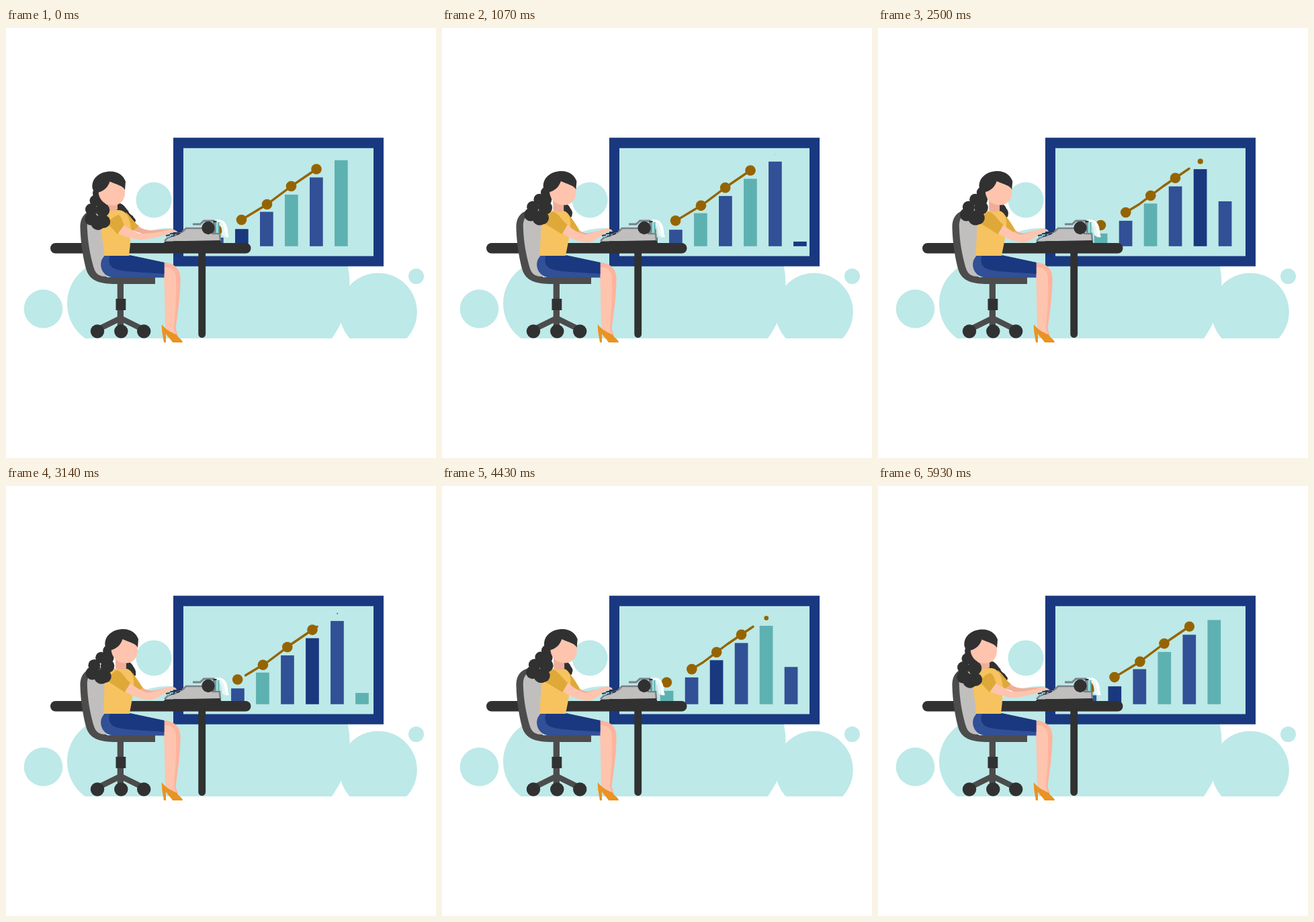
An HTML page for the animation above (6000 ms loop, 640 px wide and 640 px high).

```html
<!DOCTYPE html>
<html lang="en">
<head>
<meta charset="utf-8">
<title>Typing report</title>
<style>
html, body { margin: 0; width: 100%; height: 100%; overflow: hidden; background: #fff; }
svg { display: block; width: 100%; height: 100%; }
.mist { fill: #bde9e8; } .navy { fill: #1a387f; } .blue { fill: #315096; } .teal { fill: #5eb1b1; }
.dark { fill: #313131; } .iron { fill: #4c4c4c; } .grey { fill: #c1bebe; }
.skin { fill: #fec4ae; } .shade { fill: #f0ae98; } .gold { fill: #f6c360; } .ochre { fill: #dfa939; }
.brown { fill: #956400; }
</style>
</head>
<body>
<svg viewBox="0 0 640 640" xmlns="http://www.w3.org/2000/svg">
  <clipPath id="floor"><rect width="640" height="462"/></clipPath>
  <g class="mist" clip-path="url(#floor)">
    <circle cx="220" cy="256" r="26.5"/>
    <circle cx="55.5" cy="418" r="28.8"/>
    <circle cx="610.5" cy="369.5" r="11.5"/>
    <circle cx="155" cy="410" r="64"/>
    <circle cx="240" cy="398" r="100"/>
    <circle cx="375" cy="381" r="136.5"/>
    <circle cx="554" cy="422.5" r="57.8"/>
    <rect x="155" y="400" width="220" height="62"/>
  </g>

  <rect class="navy" x="249" y="163.3" width="313" height="191.4"/>
  <rect class="mist" x="264" y="178.8" width="283" height="160.7"/>
  <g id="bars"></g>
  <path id="trend" fill="none" stroke="#956400" stroke-width="3.4" stroke-linecap="round" stroke-linejoin="round"/>
  <g id="dots" class="brown"></g>

  <rect class="dark" x="286.3" y="325" width="10.8" height="136" rx="5.4"/>
  <rect class="dark" x="66" y="320" width="298.5" height="15.4" rx="7.7"/>

  <!-- typewriter -->
  <path d="M311 286 C323 283 329 290 330 302 C330 306 331 309 332 311 C328 312 325 311 322 308 C322 299 321 293 313 290 Z" fill="#fff"/>
  <path d="M319 288 C326 292 325 303 328 311 L322 308 C322 299 321 293 315 290 Z" fill="#e4f6f5"/>
  <path class="grey" d="M238 317 L262 304 L268 298 L292 298 L300 306 L318 306 L319 317 Z"/>
  <path d="M236 317 L240 313 L263 303 L268 298 L292 298 M306 306 L318 306 L319 317" fill="none" stroke="#7b8189" stroke-width="2.6"/>
  <path class="dark" d="M234 320.5 L237 317.5 L319 316 L320.5 320.5 Z"/>
  <rect class="teal" x="310" y="289" width="7.5" height="16"/>
  <rect x="313" y="289" width="2.5" height="16" fill="#a5dfdc"/>
  <path d="M278 292 L289 292 L294.500 287 L309 287 L311 304" fill="none" stroke="#7b8189" stroke-width="2.8"/>
  <circle class="dark" cx="301" cy="297.5" r="9.7"/>
  <rect class="dark" x="308.500" y="287" width="5" height="2.2"/>
  <path d="M238 309 l6 -1 M244 306.500 l6 -1 M250 305 l6 -1 M256 303.500 l6 -1 M246 310 l5 -2 M254 307.500 l5 -2" stroke="#25324e" stroke-width="2"/>
  <path d="M239 311.500 h4 M246 308.500 h3" stroke="#5eb1b1" stroke-width="1.6"/>

  <!-- chair -->
  <path class="iron" d="M140 270 C119 270 110 280 110.500 298 C111 320 115 343 119 358 C124 376 138 381 165 381 L222 381 L222 371 L150 371 L145 272 Z"/>
  <path class="grey" d="M140 276 C124 276 120 284 121 300 C122 324 127 345 131 358 C134 367 140 370 150 370 L150 285 Z"/>
  <rect class="iron" x="165.700" y="380" width="9.300" height="65"/>
  <path d="M136 449 L170.500 432 L205 449" fill="none" stroke="#4c4c4c" stroke-width="8.5"/>
  <rect class="dark" x="163.500" y="403" width="14.800" height="17"/>
  <g class="dark">
    <circle cx="136" cy="451.500" r="10.200"/>
    <circle cx="171.300" cy="451.500" r="10.200"/>
    <circle cx="205.200" cy="451.500" r="10.200"/>
  </g>

  <!-- legs, shoe and skirt -->
  <path fill="#ffb39c" d="M235 349 C252 350 261 360 259.500 377 C259 405 255 428 252.500 447 L256 459 L238 449 Z"/>
  <path class="skin" d="M235 349 L235 356 C247 355 253 361 253 376 C254 405 251 430 250 447 L253 457 L237 447 Z"/>
  <path d="M232 441 C238 450 248 454 254 456.500 C257 462 262 463 263 468 L248 468 C245 463 241 460 238 455 L238 468 L235 468 C234 460 231 450 232 441 Z" fill="#ea9322"/>
  <path class="blue" d="M147 338 L186 338.500 L235.500 349 L235.500 371.500 L160 371.500 C143 370 138 354 143 344 Z"/>
  <path class="navy" d="M155 338 L186 338.500 L235.500 349 L235.500 366 C205 363 172 364 159 357 C153 352 152 345 155 338 Z"/>

  <!-- upper body -->
  <path class="dark" id="sideHair"/>
  <path class="shade" id="farArm"/>
  <path class="ochre" id="farSleeve"/>
  <path class="gold" id="torso"/>
  <path class="shade" id="neck"/>
  <path class="skin" id="nearArm"/>
  <path class="ochre" id="nearSleeve"/>
  <g class="dark" id="curls"></g>
  <g id="head">
    <path class="skin" d="M137.500 243 C137.500 230 147 223 158 223 C168 223 177 230 177 238 L177 247 C176 258 168 264 160 264 C147 264 138 256 137.500 243 Z"/>
    <path class="dark" d="M128.500 238 C127 224 139 213.500 156 213.500 C167 213.500 175 220 178 228.500 L177 241 C175 235 164 233 154.500 228.500 C152 236 147 242 138 244.500 C136 248 131 246 128.500 238 Z"/>
  </g>
</svg>
<script>
const LOOP = 6000, FPS = 14, FILM = 25, STEP = 37;
const $ = id => document.getElementById(id);
const lerp = (a, b, k) => a + (b - a) * k;
const smooth = k => k * k * (3 - 2 * k);

function make(parent, tag, count) {
  return Array.from({ length: count }, () =>
    $(parent).appendChild(document.createElementNS('http://www.w3.org/2000/svg', tag)));
}
function set(node, attrs) {
  for (const key in attrs) node.setAttribute(key, attrs[key]);
}

// Blend two path strings of equal structure.
function mix(a, b, k) {
  const to = b.match(/-?[\d.]+/g);
  let i = 0;
  return a.replace(/-?[\d.]+/g, n => lerp(+n, +to[i++], k).toFixed(2));
}

// Gentle start and stop: cubic-bezier(.1, 0, .9, 1).
function ease(u) {
  let lo = 0, hi = 1;
  for (let i = 0; i < 24; i++) {
    const s = (lo + hi) / 2, r = 1 - s;
    if (.3 * r * r * s + 2.7 * r * s * s + s * s * s < u) lo = s; else hi = s;
  }
  return smooth(lo);
}

// Body lean over time: [seconds, amount].
const lean = [[0, 0], [1.35, 1], [1.9, 1], [3.2, .76], [4.5, .95], [6, 0]];
function leanAt(t) {
  const i = Math.max(1, lean.findIndex(k => k[0] >= t));
  const [t0, a] = lean[i - 1], [t1, b] = lean[i];
  return lerp(a, b, smooth((t - t0) / (t1 - t0)));
}

// Each part: upright shape, leaning shape.
const parts = {
  sideHair: [
    'M166 260 C176 261 178 269 182 272 C183 278 189 278 190 282 C196 287 192 291 187 289 L170 276 L160 268 Z',
    'M182 260 C188 262 191 264 192 268 C196 272 195 276 194 277 C194 281 190 283 187 280 L178 272 L174 268 Z'],
  farArm: [
    'M197 295 C204 300 212 302 222 301 L246 299 L248 303 L205 307 L188 301 Z',
    'M205 302 C212 306 216 307 222 305 L246 299 L248 303 L214 313 L196 306 Z'],
  farSleeve: [
    'M178 274 C184 278 187 285 198 295 L187 303 L182 290 Z',
    'M187 275 C194 283 199 290 206 303 L193 307 L187 290 Z'],
  torso: [
    'M146 280 C148 274 152 271 158 271 L168 271 C177 272 182 277 185 292 C187 302 185 325 183 339 L146 339 C146 325 141 305 141 292 Z',
    'M150 280 C152 275 158 273 162 272 L182 272 C188 274 191 277 192 290 C192 303 187 325 184 339 L145 339 C146 325 148 310 148 295 Z'],
  neck: [
    'M150 255 L166 258 L166 270 C161 273 154 273 150 270 Z',
    'M167 255 L183 258 L183 272 C177 275 170 274 167 271 Z'],
  nearArm: [
    'M175 293 C184 299 190 302 198 306 C212 307 228 304 238 301 L246 299 L252 301 L256 304 L247 304 L238 308 C222 312 205 316 197 315 C186 313 176 310 165 305 Z',
    'M187 292 C196 300 204 306 215 308 C224 306 232 302 238 300 L246 298 L252 300 L254 303 L246 303 L240 307 C234 311 228 319 219 320 C207 320 192 313 179 305 Z'],
  nearSleeve: [
    'M167 278 C173 281 173 288 176 293 L166 307 L151 291 C155 285 160 281 167 278 Z',
    'M164 273 C172 273 178 285 188 293 L180 307 L151 290 C153 283 157 277 164 273 Z']
};

// Curl: upright x, y, leaning x, y, radius, lag.
const curls = [
  [138, 246, 158, 245, 9, 0], [133, 257, 149, 255, 8.5, .5],
  [127, 270, 141, 266, 9, .9], [127, 284, 138, 277, 9.8, 1],
  [137, 290, 150, 282, 10.7, .7], [145.5, 288, 153, 282, 9.7, .6],
  [144, 271, 157, 267, 10.3, .4], [140, 258, 157, 255, 9, .2]
];

const stops = [[499, 186], [462, 210], [424.5, 235.5], [388.5, 262.5], [350.5, 285.5], [314, 301], [277, 316]];
const hues = ['blue', 'teal', 'blue', 'teal', 'blue', 'navy'];
const bars = make('bars', 'rect', 7), dots = make('dots', 'circle', 6), locks = make('curls', 'circle', curls.length);

function barHeight(n, u) {
  if (n === 0) return 128 * ease(u);
  if (n < 5) return 25.6 * (6 - n - u);
  return n === 5 ? 25.6 - 12.8 * u : 12.8;
}

function drawChart(t) {
  const k = Math.floor(t), u = t - k;
  bars.forEach((bar, n) => {
    const h = barHeight(n, u);
    set(bar, { x: 526 - STEP * (n + u), y: 324.8 - h, width: 19.7, height: h, class: hues[(n - k + 12) % 6] });
  });
  dots.forEach((dot, n) => {
    const [x0, y0] = stops[n], [x1, y1] = stops[n + 1];
    set(dot, { cx: lerp(x0, x1, u), cy: lerp(y0, y1, u), r: n ? 7.8 : 7.8 * ease(u) });
  });
  const cut = Math.min(u, 1 - u);
  const tail = [0, 1].map(i => lerp(stops[4][i], stops[3][i], cut));
  set($('trend'), { d: 'M' + [tail, stops[3], stops[2], stops[1], [463, 209.3]].join(' L') });
}

function drawWoman(t) {
  const p = leanAt(t);
  for (const id in parts) set($(id), { d: mix(...parts[id], p) });
  const drag = 7 * Math.sin(Math.PI * p ** 2.5);
  curls.forEach(([x0, y0, x1, y1, r, lag], i) =>
    set(locks[i], { cx: lerp(x0, x1, p) - drag * lag, cy: lerp(y0, y1, p), r }));
  set($('head'), { transform: `translate(${25 * p} ${-.5 * p})` });
}

function frame() {
  const now = performance.now() % LOOP;
  const shot = Math.floor((now + 6) * FPS / 1000) % (LOOP * FPS / 1000);
  const t = Math.ceil(shot * FILM / FPS - 1e-6) / FILM;
  drawChart(t);
  drawWoman(t);
  requestAnimationFrame(frame);
}
frame();
</script>
</body>
</html>
```
